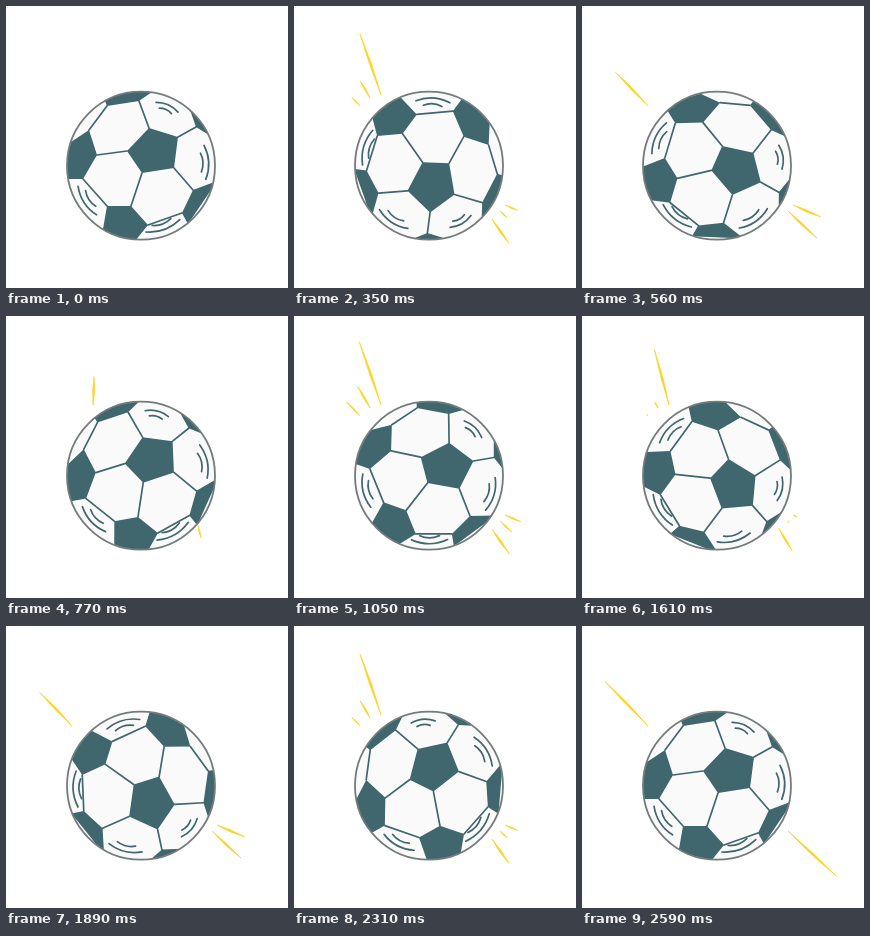
Animation of 282 by 282 pixels, one loop 2660 ms. Source, as an HTML page:

```html
<!DOCTYPE html>
<html>
<head>
<meta charset="utf-8">
<style>
  html, body { margin: 0; width: 100%; height: 100%; overflow: hidden; background: #fff; }
  svg { display: block; width: 100%; height: 100%; }
  #patches { fill: #40666e; }
  #seams, #marks { fill: none; stroke: #40666e; stroke-width: 1.7; stroke-linecap: round; }
  #streaks { fill: #fdd32a; stroke: #fdd32a; stroke-width: .7; stroke-linejoin: round; }
</style>
</head>
<body>
<svg viewBox="0 0 282 282">
  <clipPath id="round"><circle cx="135" cy="159.7" r="74"/></clipPath>
  <path id="streaks"/>
  <circle cx="135" cy="159.7" r="74" fill="#fafafa"/>
  <g clip-path="url(#round)">
    <g id="ball"><path id="patches"/><path id="seams"/><path id="marks"/></g>
  </g>
  <circle cx="135" cy="159.7" r="74" fill="none" stroke="#737b7c" stroke-width="1.8"/>
</svg>
<script>
const STEP = 70, STEPS = 38, TURN = 3600 / 37, CYCLE = 28 / 3, WRAP = 0.7;
const CX = 135, CY = 159.7;
const $ = id => document.getElementById(id);
const setPath = (id, d) => $(id).setAttribute('d', d);

// Corners of the dark patches; the rim clips what lies outside.
const patches = {
  mid: ['121 145', '143 122', '172 131', '168 162', '136 167'],
  top: ['101 100', '133 95', '146 86', '95 85'],
  right: ['190 121', '183 101', '215 100', '211 134'],
  low: ['187 184', '211 175', '182 218', '176 207'],
  bottom: ['101 200', '125 200', '142 219', '125 240', '97 223'],
  left: ['83 124', '91 149', '77 173', '55 173', '65 136']
};
const { mid, top: crown, right, low, bottom, left } = patches;
const seams = [
  [mid[0], left[1]], [mid[1], crown[1]], [mid[2], right[0]], [mid[3], low[0]], [mid[4], bottom[1]],
  [crown[0], left[0]], [left[2], bottom[0]], [bottom[2], low[3]]
];

// A bowed stroke near the rim: angle in degrees, radius, half length.
function mark(angle, r, half) {
  const c = Math.cos(angle * Math.PI / 180), s = Math.sin(angle * Math.PI / 180);
  const at = (out, along) => `${CX + c * out - s * along} ${CY + s * out + c * along}`;
  return `M${at(r, -half)}Q${at(r + half * 0.45, 0)} ${at(r, half)}`;
}

setPath('patches', Object.values(patches).map(p => `M${p.join('L')}Z`).join(''));
setPath('seams', seams.map(s => `M${s.join('L')}`).join(''));
setPath('marks', [[-66, 12], [-3, 17], [70, 18], [147, 17]]
  .map(([a, half]) => mark(a, 64, half) + mark(a, 60, half * 0.55)).join(''));

// Growth curves as [phase, share of full length].
const early = [[1, 0], [1.67, 0.42], [5, 0.95], [6, 1]];
const middle = [[4, 0], [5, 0.45], [8, 1]];
const late = [[4.2, 0], [5, 0.15], [8, 0.6], [8.34, 0.6], [8.67, 0.8], [9, 1]];
const streaks = [
  { x: 87, y: 89, angle: -109, len: 68, grow: early, end: 6.6, drift: 0 },
  { x: 76, y: 92, angle: -120, len: 44, grow: middle, end: 7.5 },
  { x: 66, y: 100, angle: -134, len: 78, max: 0.79, grow: late, end: 11 },
  { x: 198, y: 213, angle: 55, len: 31, grow: early, end: 7, drift: -6 },
  { x: 211, y: 199, angle: 23, len: 30, grow: middle, end: 8.5 },
  { x: 206, y: 205, angle: 43, len: 66, grow: late, end: 11 }
];

function sample(curve, t) {
  const i = curve.findIndex(key => key[0] >= t);
  if (i < 0) return 1;
  if (i === 0) return 0;
  const [a, from] = curve[i - 1], [b, to] = curve[i];
  return from + (to - from) * (t - a) / (b - a);
}

// A slim lens, tapered at both ends; early streaks swing as they grow.
function lens(s, phase) {
  const len = s.len * Math.min(sample(s.grow, phase), s.max || 1);
  if (len <= 0 || phase > s.end) return '';
  const swing = s.grow === early ? Math.max(0, (5 - phase) / 3.33) : 0;
  const a = (s.angle + 21 * swing) * Math.PI / 180, c = Math.cos(a), n = Math.sin(a);
  const x = s.x + (s.drift || 0) * swing, y = s.y + (s.drift || 0) * 0.6 * swing;
  const w = Math.min(2.3, 0.8 + len / 20);
  const at = (d, side) => `${x + c * d - n * side} ${y + n * d + c * side}`;
  return `M${at(0, 0)}Q${at(len / 2, w)} ${at(len, 0)}Q${at(len / 2, -w * 0.7)} ${at(0, 0)}Z`;
}

function draw() {
  const step = Math.floor(performance.now() / STEP) % STEPS;
  // Each burst lingers a little into the next cycle; the loop opens without one.
  const phase = step ? (step - WRAP) % CYCLE + WRAP : 0;
  $('ball').setAttribute('transform', `rotate(${step * TURN} ${CX} ${CY})`);
  setPath('streaks', streaks.map(s => lens(s, phase)).join(''));
  requestAnimationFrame(draw);
}
draw();
</script>
</body>
</html>
```
